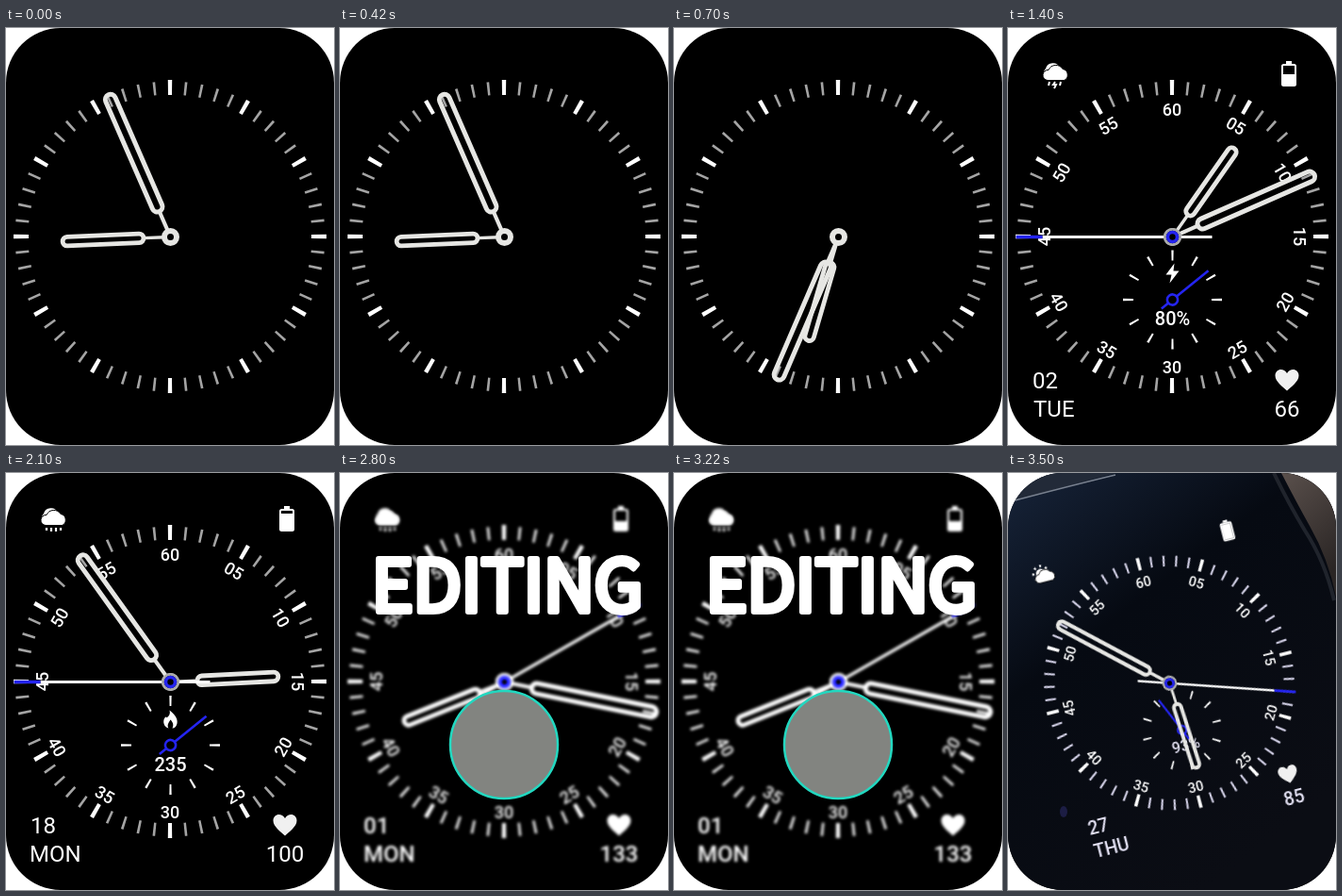
An HTML page without scripts that plays this animation: 348x442 px, repeating every 4.2 s.

```html
<!DOCTYPE html>
<html lang="en">
<head>
<meta charset="utf-8">
<title>Watch face</title>
<style>
  html, body { margin: 0; width: 100%; height: 100%; overflow: hidden; background: #fff; }
  svg { display: block; width: 100vw; height: 100vh; }
  text { font: 24px Roboto, sans-serif; fill: #fff; }
  .mid, .numerals text { text-anchor: middle; }
  .numerals text { font-size: 18px; font-weight: 500; }
  .value { font-size: 20px; font-weight: 500; }
  .white { fill: #fff; }
  .line, .hand { fill: none; stroke: #fff; }
  .hand { stroke: #e6e6e3; }
  .blue { fill: none; stroke: #2424f0; }

  /* Each scene sets its own angles; they inherit into the shared parts. */
  .hour { transform: rotate(var(--h)); }
  .minute { transform: rotate(var(--m)); }
  .second { transform: rotate(var(--s)); }
  .gauge { transform: rotate(var(--g)); }
  .minor { stroke: var(--minor, #a4a4a4); }

  .scene {
    visibility: hidden;
    animation: show 4.2s step-end infinite;
    animation-delay: calc(var(--i) * .7s - 4.2s);
  }
  @keyframes show {
    0% { visibility: visible; }
    16.6667%, 100% { visibility: hidden; }
  }
  .blurred { filter: blur(1.8px) brightness(1.5); }
  .blurred text { font-weight: 500; }
  .photo { filter: blur(.5px); }
  .photo text { font-weight: 500; fill: #e4e2f4; }
  .title {
    font: 76px "Noto Sans CJK JP", "Noto Sans CJK SC", "Noto Sans CJK", sans-serif;
    letter-spacing: -1px;
    stroke: #fff; stroke-width: 6; stroke-linejoin: round;
  }
</style>
</head>
<body>
<svg viewBox="-174 -221 348 442">
  <defs>
    <clipPath id="screen"><rect x="-174" y="-221" width="348" height="442" rx="58"/></clipPath>
    <linearGradient id="glass" x1="0" y1="0" x2=".6" y2="1">
      <stop offset="0" stop-color="#17243a"/>
      <stop offset=".4" stop-color="#060a12"/>
      <stop offset="1" stop-color="#0b0d14"/>
    </linearGradient>
    <linearGradient id="skin" x1="0" y1="0" x2=".4" y2="1">
      <stop offset="0" stop-color="#5a504c"/>
      <stop offset="1" stop-color="#2a2524"/>
    </linearGradient>

    <g id="ticks" fill="none">
      <circle class="minor" r="157.5" stroke-width="14" pathLength="360" stroke-dasharray=".95 5.05" stroke-dashoffset=".475"/>
      <circle r="158" stroke="#fff" stroke-width="16" pathLength="360" stroke-dasharray="1.55 28.45" stroke-dashoffset=".775"/>
    </g>

    <g id="numerals" class="numerals">
      <text y="-128">60</text>
      <text y="-129" transform="rotate(30)">05</text>
      <text y="-129" transform="rotate(60)">10</text>
      <text y="-129" transform="rotate(90)">15</text>
      <text y="145" transform="rotate(-60)">20</text>
      <text y="145" transform="rotate(-30)">25</text>
      <text y="145">30</text>
      <text y="145" transform="rotate(30)">35</text>
      <text y="145" transform="rotate(60)">40</text>
      <text y="-129" transform="rotate(-90)">45</text>
      <text y="-129" transform="rotate(-60)">50</text>
      <text y="-129" transform="rotate(-30)">55</text>
    </g>

    <g id="hands" class="hand" transform="translate(.5 .5)">
      <g class="hour">
        <path d="M0-6V-28" stroke-width="3.4"/>
        <rect x="-4.8" y="-114.5" width="9.6" height="86" rx="4.8" stroke-width="4.8"/>
      </g>
      <g class="minute">
        <path d="M0-6V-30" stroke-width="4.2"/>
        <rect x="-5.5" y="-164.500" width="11" height="135" rx="5.5" stroke-width="5"/>
      </g>
      <circle r="6.5" stroke-width="6" fill="#000"/>
    </g>

    <g id="second" transform="translate(.5 .5)">
      <g class="second">
        <path class="line" d="M0 42V-138" stroke-width="3"/>
        <path class="blue" d="M0-138V-166" stroke-width="3.6"/>
      </g>
      <circle r="8.2" stroke="#aaa" stroke-width="2.8"/>
      <circle class="blue" r="5" stroke-width="3.6" style="fill:#000"/>
    </g>

    <g id="subdial">
      <circle class="line" r="47" stroke-width="11" pathLength="360" stroke-dasharray="2.6 27.4" stroke-dashoffset="1.3"/>
      <g class="gauge blue" stroke-width="2.6">
        <path d="M0 15V6M0-6V-49"/>
        <circle r="5.6"/>
      </g>
    </g>

    <path id="bolt" class="white" d="M2-38-7-26H-1L-3-17 7-30H1Z"/>
    <path id="flame" class="white" d="M-1-37C5-32 8-28 7-23 6-19 4-18 2-18 4-22 2-25 0-27-2-24-4-21-2-18-6-19-8-23-7-27-6-30-4-31-4-29-1-31 0-34-1-37Z"/>
    <path id="heart" fill="#f0f0f0" transform="translate(122 152)" d="M0 11.5C-4 7.5-12.5 2-12.5-4.5-12.5-12-3.5-13.5 0-7 3.5-13.5 12.5-12 12.5-4.5 12.5 2 4 7.5 0 11.5Z"/>
    <path id="cloud" class="white" stroke="#000" d="M-132-165.500A5.500 5.500 0 0 1-131-176.500 8.500 8.500 0 0 1-116-177.500 6.300 6.300 0 0 1-114.500-165.500Z"/>
    <path id="back-cloud" class="white" d="M-133-169A5.500 5.500 0 0 1-134-178 8 8 0 0 1-119-179Z"/>
    <path id="rain" class="line" stroke-width="2.2" d="M-131-163v3m5-3v4m5-4v4m5-4v3"/>
    <path id="storm" class="line" stroke-width="2" d="M-130-164l-1 4m7-4-2 3h3l-2 4m7-7-1 4"/>
    <g id="sun" class="white">
      <circle cx="-128" cy="-177" r="6.5"/>
      <circle class="line" cx="-128" cy="-177" r="10" stroke-width="3" stroke-dasharray="2.500 5.350"/>
    </g>
    <g id="battery">
      <rect class="line" x="117" y="-182" width="14" height="22" rx="1.5" stroke-width="2"/>
      <path class="white" d="M121-186h6v3h-6z"/>
    </g>

    <g id="face">
      <use href="#ticks"/>
      <use href="#numerals"/>
      <use href="#battery"/>
      <use href="#heart"/>
    </g>
    <g id="clouds">
      <use href="#back-cloud"/>
      <use href="#cloud"/>
    </g>
  </defs>

  <g clip-path="url(#screen)">
    <rect x="-174" y="-221" width="348" height="442"/>

    <g class="scene" style="--i:0; --h:267.6deg; --m:-23.6deg">
      <use href="#ticks"/>
      <use href="#hands"/>
    </g>

    <g class="scene" style="--i:1; --h:196.3deg; --m:203.3deg">
      <use href="#ticks"/>
      <use href="#hands"/>
    </g>

    <g class="scene" style="--i:2; --h:35deg; --m:66.3deg; --s:-90deg; --g:51deg">
      <use href="#face"/>
      <use href="#clouds"/>
      <use href="#storm"/>
      <path class="white" d="M118-172h12v11h-12z"/>
      <g transform="translate(.5 67)">
        <use href="#subdial"/>
        <use href="#bolt" y="-.5"/>
        <text class="mid value" y="27">80%</text>
      </g>
      <text x="-148" y="161">02</text>
      <text x="-147" y="191">TUE</text>
      <text class="mid" x="122" y="191">66</text>
      <use href="#hands"/>
      <use href="#second"/>
    </g>

    <g class="scene" style="--i:3; --h:87.1deg; --m:-35.7deg; --s:-90deg; --g:51deg">
      <use href="#face"/>
      <use href="#clouds"/>
      <use href="#rain"/>
      <path class="white" d="M118-178h12v17h-12z"/>
      <g transform="translate(.5 67.5)">
        <use href="#subdial"/>
        <use href="#flame"/>
        <text class="mid value" y="27">235</text>
      </g>
      <text x="-148" y="161">18</text>
      <text x="-149" y="191">MON</text>
      <text class="mid" x="122" y="191">100</text>
      <use href="#hands"/>
      <use href="#second"/>
    </g>

    <g class="scene" style="--i:4; --h:248.1deg; --m:101.5deg; --s:60.2deg">
      <g class="blurred">
        <use href="#face"/>
        <use href="#clouds"/>
        <use href="#rain"/>
        <path class="white" d="M118-170h12v9h-12z"/>
        <text x="-149" y="161">01</text>
        <text x="-149" y="191">MON</text>
        <text class="mid" x="122" y="191">133</text>
        <use href="#hands"/>
        <use href="#second"/>
      </g>
      <circle cy="67" r="57" fill="#828480" stroke="#22d8c0" stroke-width="2.5"/>
      <text class="mid title" x="3" y="-74">EDITING</text>
    </g>

    <g class="scene" style="--i:5; --h:176.4deg; --m:-48.2deg; --s:107.8deg; --g:-24deg; --minor:#d4d2e8">
      <rect x="-174" y="-221" width="348" height="442" fill="url(#glass)"/>
      <path fill="#222a38" d="M-174-221H-60L-174-190Z"/>
      <path fill="none" stroke="#78808e" stroke-width="1.5" d="M-174-190Q-110-207-60-219"/>
      <path fill="url(#skin)" d="M116-221Q132-190 146-165 166-130 174-90V-221Z"/>
      <path fill="none" stroke="#20242c" stroke-width="4" d="M108-221Q124-188 141-160 162-128 172-86"/>
      <ellipse class="photo" cx="-115" cy="138" rx="4" ry="6" fill="#1c1d44"/>
      <g class="photo" transform="matrix(.781 -.197 .204 .796 -3 1.5)">
        <use href="#face"/>
        <use href="#sun"/>
        <use href="#cloud"/>
        <path class="white" d="M118-181h12v20h-12z"/>
        <g transform="translate(1 63)">
          <use href="#subdial"/>
          <text class="mid value" y="27">93%</text>
        </g>
        <text x="-151" y="165">27</text>
        <text x="-151" y="196">THU</text>
        <text class="mid" x="122" y="191">85</text>
        <use href="#hands"/>
        <use href="#second"/>
      </g>
    </g>
  </g>
</svg>
</body>
</html>
```
